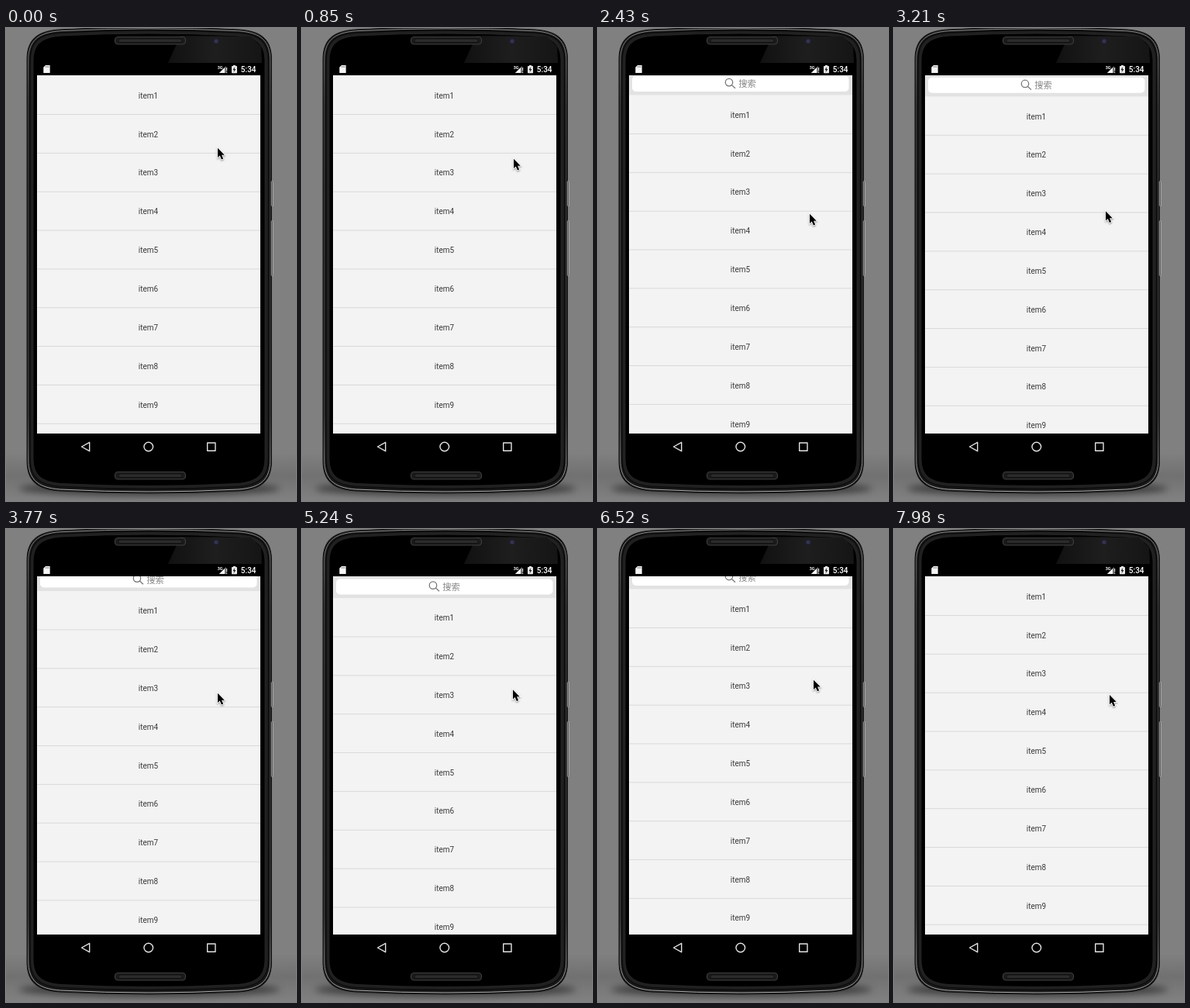
An HTML page with a canvas for the animation above (8000 ms loop, 374 by 610 pixels).

```html
<!DOCTYPE html>
<html lang="zh">
<head>
<meta charset="utf-8">
<title>Pull to search</title>
<style>
html, body { margin: 0; width: 100%; height: 100%; overflow: hidden; background: #808080; }
canvas { display: block; width: 374px; height: 610px; }
</style>
</head>
<body>
<canvas id="stage"></canvas>
<script>
const W = 374, H = 610, LOOP = 8000;
const SCREEN = { x: 40, y: 61, w: 288, h: 462 };
const LIST_TOP = 61.5, ROW = 49.85, BAR = 28;

const canvas = document.getElementById('stage');
const dpr = window.devicePixelRatio || 1;
canvas.width = W * dpr;
canvas.height = H * dpr;
const g = canvas.getContext('2d');
g.scale(dpr, dpr);

// Each move: start, end, number of steps, target values and their easing powers.
const moves = [
  { a: 180, b: 560, n: 7, y: 184 },
  { a: 730, b: 850, n: 3, y: 168 },
  { a: 1150, b: 1830, n: 10, y: 239, s: 23, lead: 0.6, pow: 2.2 },
  { a: 2430, b: 2670, n: 4, s: 28, pow: 0.66 },
  { a: 3210, b: 3770, n: 8, y: 211, s: 18.5 },
  { a: 4070, b: 4250, n: 4, x: 271.3, y: 206.5, s: 17.5 },
  { a: 4550, b: 4670, n: 3, s: 16.5 },
  { a: 4970, b: 5330, n: 5, s: 28, out: true },
  { a: 5510, b: 6280, n: 12, x: 277.4, y: 198, s: 17.5 },
  { a: 6340, b: 6850, n: 8, y: 187, s: 11.5, pow: 1.4 },
  { a: 7150, b: 7380, n: 4, s: 0 },
  { a: 7860, b: 7980, n: 3, y: 213.3 }
];

function stateAt(t) {
  const st = { x: 272.4, y: 154, s: 0 };
  for (const m of moves) {
    if (t < m.a) break;
    const gap = (m.b - m.a) / (m.n - 1);
    const p = Math.min(1, (Math.floor((t - m.a) / gap + 0.01) + 1) / m.n);
    const hand = Math.min(1, p / (m.lead || 1));
    const pull = m.out ? 1 - (1 - p) ** 2 : p ** (m.pow || 1);
    if ('x' in m) st.x += (m.x - st.x) * hand;
    if ('y' in m) st.y += (m.y - st.y) * hand;
    if ('s' in m) st.s += (m.s - st.s) * pull;
  }
  return st;
}

function paint(fill, stroke, lw = 1) {
  if (fill) { g.fillStyle = fill; g.fill(); }
  if (stroke) { g.strokeStyle = stroke; g.lineWidth = lw; g.stroke(); }
}

function rounded(x, y, w, h, r, ...style) {
  g.beginPath();
  g.roundRect(x, y, w, h, r);
  paint(...style);
}

function disc(x, y, rx, ry, ...style) {
  g.beginPath();
  g.ellipse(x, y, rx, ry, 0, 0, Math.PI * 2);
  paint(...style);
}

function poly(points, ...style) {
  g.beginPath();
  points.forEach(([x, y]) => g.lineTo(x, y));
  g.closePath();
  paint(...style);
}

function label(str, x, y, font, color, align = 'left') {
  g.font = font;
  g.fillStyle = color;
  g.textAlign = align;
  g.fillText(str, x, y);
}

function fade(x0, y0, x1, y1, ...colors) {
  const gr = g.createLinearGradient(x0, y0, x1, y1);
  colors.forEach((c, i) => gr.addColorStop(i / (colors.length - 1), c));
  return gr;
}

// Phone outline with bowed top and bottom edges.
function shell(l, t, r, b, c, ...style) {
  const m = (l + r) / 2, k = c * 0.4;
  g.beginPath();
  g.moveTo(l, t + c);
  g.bezierCurveTo(l, t + k, l + k * 0.7, t + 5, l + c, t + 3);
  g.quadraticCurveTo(m, t - 3, r - c, t + 3);
  g.bezierCurveTo(r - k * 0.7, t + 5, r, t + k, r, t + c);
  g.lineTo(r, b - c);
  g.bezierCurveTo(r, b - k, r - k * 0.7, b - 5, r - c, b - 3);
  g.quadraticCurveTo(m, b + 3, l + c, b - 3);
  g.bezierCurveTo(l + k * 0.7, b - 5, l, b - k, l, b - c);
  g.closePath();
  paint(...style);
}

function speaker(y) {
  rounded(140.5, y, 91, 9.5, 4, '#1b1b1b', '#3c3c3c', 1.2);
  rounded(145, y + 2.5, 82, 4.5, 2, '#2b2b2b', '#101010', 1);
}

function floorShadow() {
  g.fillStyle = fade(0, 548, 0, 608, 'rgba(60,60,60,0)', 'rgba(60,60,60,.22)', 'rgba(60,60,60,0)');
  g.fillRect(0, 548, W, 60);
  g.save();
  g.filter = 'blur(4px)';
  disc(185, 594, 168, 10, 'rgba(30,30,30,.6)');
  g.restore();
}

function phone() {
  g.fillStyle = '#808080';
  g.fillRect(0, 0, W, H);
  floorShadow();

  const rim = fade(0, 0, 0, 600, '#8a8a8a', '#484848', '#404040', '#404040', '#404040', '#484848', '#b0b0b0');
  shell(27, -1, 342.5, 600, 42, '#101010', '#1c1c1c', 1);
  shell(28.8, 0.8, 340.8, 598, 41, '#1a1a1a', rim, 1);
  shell(31, 3, 338.5, 594.5, 39, '#202020', '#0c0c0c', 1.5);
  shell(35, 7, 334, 590.5, 36, '#000', '#2a2a2a', 0.8);

  rounded(342.3, 197.5, 2.2, 32, 1, '#5c5c5c', '#b4b4b4', 0.8);
  rounded(342.3, 248.5, 2.2, 71, 1, '#5c5c5c', '#b4b4b4', 0.8);

  poly([[225, 10], [316, 11], [329, 24], [330, 45], [209, 45]],
    fade(209, 0, 330, 0, '#111', '#1e1e1e', '#151515'));
  g.fillStyle = '#000';
  g.fillRect(38, 45, 292, 512);

  speaker(11.5);
  speaker(572.5);
  disc(271, 17, 4.2, 4.2, '#1d1d2c');
  disc(271, 17, 2.6, 2.6, '#35344f');
}

function statusBar() {
  poly([[51, 48], [56.7, 48], [56.7, 58], [48.3, 58], [48.3, 50.7]], '#f4f4f4');
  g.fillStyle = '#777';
  for (let i = 0; i < 3; i++) g.fillRect(51 + i * 1.8, 49, 0.8, 2);
  label('3G', 272.7, 52.8, 'bold 5.5px Roboto, sans-serif', '#eee');
  poly([[284, 49], [284, 58], [275, 58]], '#777');
  poly([[282, 51], [282, 58], [275, 58]], '#f4f4f4');
  g.fillStyle = '#f4f4f4';
  g.fillRect(284.2, 51, 1, 4.5);
  g.fillRect(284.2, 56.6, 1, 1.4);
  rounded(291, 49, 7, 9.3, 0.8, '#e8e8e8');
  g.fillRect(293, 48, 3, 1.5);
  poly([[295.2, 50], [292.4, 54.2], [294.2, 54.2], [293.5, 57.2], [296.5, 53], [294.7, 53]], '#222');
  label('5:34', 302.8, 57, '500 10px Roboto, sans-serif', '#fff');
}

function navBar() {
  const c = '#e2e2e2';
  g.lineJoin = 'round';
  poly([[97.5, 540], [107.7, 534.3], [107.7, 545.7]], null, c, 1.4);
  disc(183.8, 540, 5.8, 5.8, null, c, 1.4);
  g.strokeRect(259.7, 535, 10.3, 10.3);
}

function searchBar(top) {
  g.fillStyle = '#e2e2e2';
  g.fillRect(SCREEN.x, top, SCREEN.w, BAR);
  rounded(44, top + 3.4, 279.5, 20, 5, '#fff');
  g.beginPath();
  g.arc(169, top + 11.6, 4.7, 0, Math.PI * 2);
  g.moveTo(172.5, top + 15.1);
  g.lineTo(177, top + 19.3);
  paint(null, '#777', 1.3);
  label('搜索', 181.3, top + 17.8, '11.3px "Noto Sans CJK SC", "Noto Sans CJK", sans-serif', '#858585');
}

function list(s) {
  g.save();
  g.beginPath();
  g.rect(SCREEN.x, SCREEN.y, SCREEN.w, SCREEN.h);
  g.clip();
  g.fillStyle = '#f3f3f3';
  g.fillRect(SCREEN.x, SCREEN.y, SCREEN.w, SCREEN.h);
  const top = LIST_TOP + s;
  if (s > 0) searchBar(top - BAR);
  for (let i = 0; i < 9; i++) {
    const y = top + i * ROW;
    label('item' + (i + 1), 183.5, y + 29.2, '10px Roboto, sans-serif', '#3a3a3a', 'center');
    g.fillStyle = '#d9d9d9';
    g.fillRect(SCREEN.x, y + ROW - 0.4, SCREEN.w, 1);
  }
  g.restore();
}

function cursor(x, y) {
  g.save();
  g.translate(x + 0.4, y + 0.8);
  g.scale(0.9, 0.9);
  g.shadowColor = 'rgba(0,0,0,.35)';
  g.shadowBlur = 2 * dpr;
  g.shadowOffsetY = dpr;
  const arrow = [[0.3, 0], [0.3, 13.6], [3.3, 10.8], [5.7, 16.3], [8.2, 15.2], [5.9, 9.9], [10, 9.9]];
  g.lineJoin = 'miter';
  poly(arrow, '#fff', '#fff', 2);
  g.shadowColor = 'transparent';
  poly(arrow, '#000');
  g.restore();
}

function draw(t) {
  const st = stateAt(t);
  phone();
  statusBar();
  navBar();
  list(st.s);
  cursor(st.x, st.y);
}

const start = performance.now();
function tick() {
  draw((performance.now() - start) % LOOP);
  requestAnimationFrame(tick);
}
tick();
</script>
</body>
</html>
```
